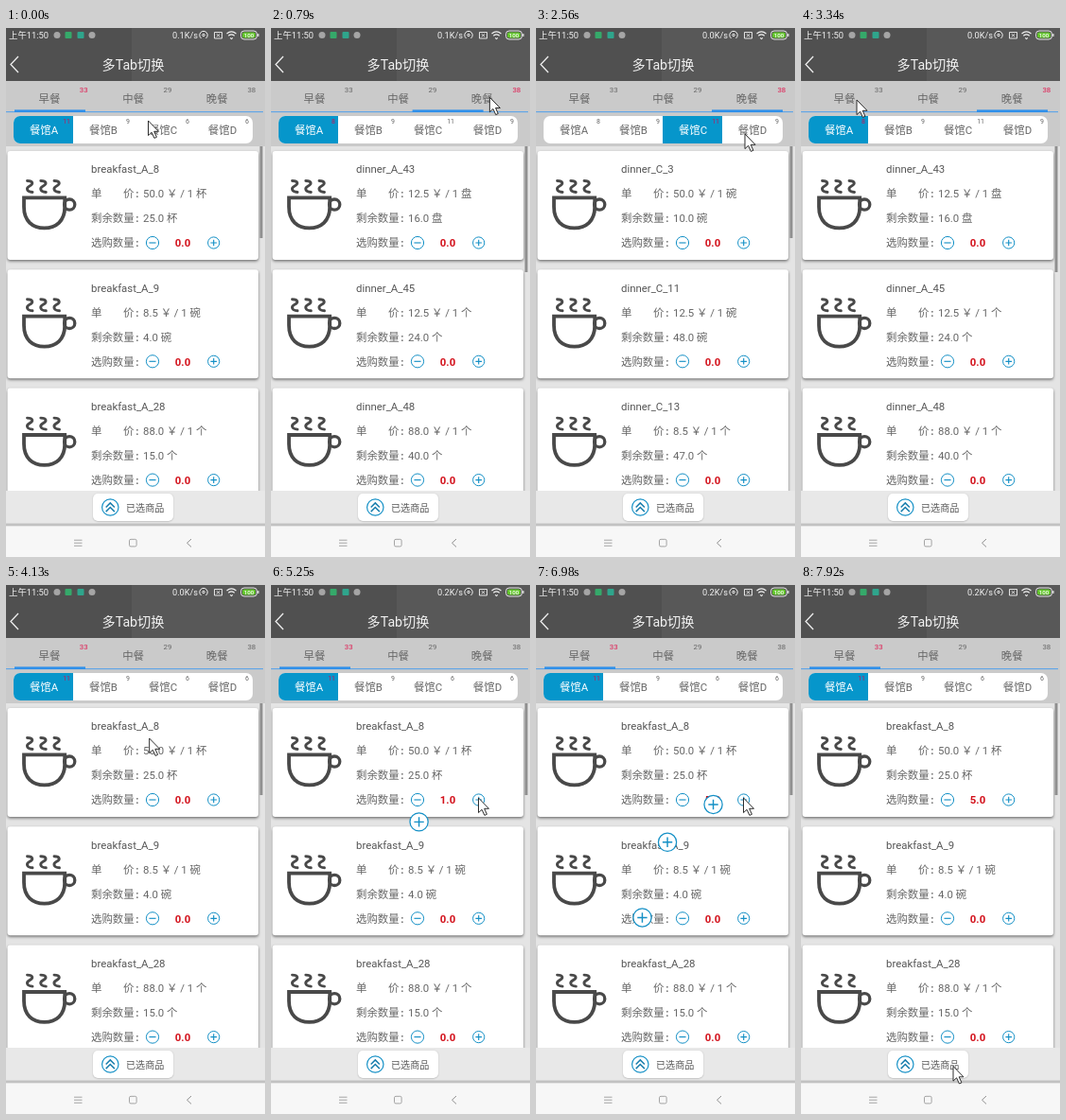
An HTML page with a canvas that plays this animation: 274x559 px, repeating every 8 s.

```html
<!DOCTYPE html>
<html lang="zh">
<head>
<meta charset="utf-8">
<title>多Tab切换</title>
<style>
html, body { margin: 0; width: 100%; height: 100%; overflow: hidden; background: #f7f7f7; }
canvas { display: block; width: 274px; height: 559px; }
</style>
</head>
<body>
<canvas id="stage"></canvas>
<script>
const W = 274, H = 559, LOOP = 8000;
const FONT = 'Roboto, "Noto Sans CJK SC", "Noto Sans CJK", sans-serif';
const BLUE = '#1490c6', GREY = '#666', RED = '#d3121c';
const canvas = document.getElementById('stage');
const ctx = canvas.getContext('2d');
const dpr = window.devicePixelRatio || 1;
canvas.width = W * dpr;
canvas.height = H * dpr;

// Each row: number, price, unit, stock
const MENUS = {
  breakfast_A: [[8, '50.0', '杯', '25.0'], [9, '8.5', '碗', '4.0'], [28, '88.0', '个', '15.0']],
  dinner_A: [[43, '12.5', '盘', '16.0'], [45, '12.5', '个', '24.0'], [48, '88.0', '个', '40.0']],
  dinner_B: [[2, '8.5', '个', '32.0'], [6, '50.0', '碗', '18.0'], [17, '12.5', '盘', '27.0']],
  dinner_C: [[3, '50.0', '碗', '10.0'], [11, '12.5', '碗', '48.0'], [13, '8.5', '个', '47.0']],
  dinner_D: [[1, '12.5', '碗', '21.0'], [5, '88.0', '盘', '36.0'], [14, '8.5', '个', '12.0']]
};
const COUNTS = { breakfast: [11, 9, 6, 6], dinner: [8, 9, 11, 9] };
const TABS = [['早餐', 33], ['中餐', 29], ['晚餐', 38]];

// Time, meal, shop
const VIEWS = [[0, 'breakfast', 0], [620, 'dinner', 0], [1640, 'dinner', 1], [2170, 'dinner', 2],
  [2650, 'dinner', 3], [3080, 'dinner', 0], [3610, 'breakfast', 0]];
const RATES = [[0, '0.1K/s'], [1000, '0.0K/s'], [4550, '0.2K/s']];
// Time, x, y
const POINTER = [[0, 150.5, 98], [120, 150.5, 98], [540, 230, 73], [760, 232, 73], [1450, 118, 109],
  [1650, 116, 109], [2050, 166, 109], [2200, 168, 109], [2520, 221, 112], [2660, 221, 112],
  [3000, 42, 108], [3100, 42, 108], [3320, 59, 76], [3650, 59, 76], [4520, 219.5, 225],
  [7000, 219.5, 225], [7800, 161, 508.5], [8000, 161, 508.5]];
const ADDS = [4990, 5355, 6380, 6620, 6860];
const FLIGHT = 900, PULSE = 150;

const clamp = v => Math.max(0, Math.min(1, v));
const smooth = v => v * v * (3 - 2 * v);
const latest = (list, t) => list.filter(k => k[0] <= t).pop();

function text(s, x, y, size, color = GREY, align = 'left', weight = 400) {
  ctx.font = `${weight} ${size}px ${FONT}`;
  ctx.fillStyle = color;
  ctx.textAlign = align;
  ctx.fillText(s, x, y + size * 0.37);
}

function rect(x, y, w, h, color) {
  ctx.fillStyle = color;
  ctx.fillRect(x, y, w, h);
}

function round(x, y, w, h, r, color) {
  ctx.beginPath();
  ctx.roundRect(x, y, w, h, r);
  ctx.fillStyle = color;
  ctx.fill();
}

function shadowed(blur, dy, alpha, draw) {
  ctx.save();
  ctx.shadowColor = `rgba(0,0,0,${alpha})`;
  ctx.shadowBlur = blur * dpr;
  ctx.shadowOffsetY = dy * dpr;
  draw();
  ctx.restore();
}

function stroke(d, color, width) {
  ctx.strokeStyle = color;
  ctx.lineWidth = width;
  ctx.stroke(new Path2D(d));
}

function ring(x, y, r, color, width, fill) {
  ctx.beginPath();
  ctx.arc(x, y, r, 0, 7);
  if (fill) {
    ctx.fillStyle = fill;
    ctx.fill();
  }
  ctx.strokeStyle = color;
  ctx.lineWidth = width;
  ctx.stroke();
}

function sign(x, y, r, plus, width = 1, fill) {
  const a = r * 0.54;
  ring(x, y, r, BLUE, width, fill);
  stroke(`M${x - a} ${y}h${2 * a}` + (plus ? `M${x} ${y - a}v${2 * a}` : ''), BLUE, width * 1.15);
}

function statusBar(t) {
  const ink = '#f2f2f2';
  text('上午11:50', 3, 8, 9.4, ink);
  round(50.5, 4, 7, 7, 3.5, '#a5a5a5');
  round(62.5, 4, 7, 7, 1, '#35a96a');
  round(75.5, 4, 7, 7, 1, '#2fa58c');
  round(87.5, 4, 7, 7, 3.5, '#a5a5a5');
  text(latest(RATES, t)[1], 176, 8, 9.2, ink);
  ring(209, 7.5, 1.2, ink, 1);
  stroke('M206.6 11A4.2 4.2 0 1 1 211.4 11', ink, 1);
  stroke('M220.5 4.5h8v6.5h-8zM223 6.2l3 3M226 6.2l-3 3', ink, 0.9);
  stroke('M233.5 6Q238.5 1.8 243.5 6M235.3 8.2Q238.5 5.6 241.7 8.2M237.2 10.4L238.5 11.6L239.8 10.4', ink, 1.1);
  ctx.beginPath();
  ctx.roundRect(248.5, 3, 17, 9, 3.5);
  ctx.strokeStyle = ink;
  ctx.lineWidth = 0.9;
  ctx.stroke();
  round(250, 4.4, 14, 6.2, 2, '#62c52b');
  rect(266.3, 6, 1.2, 3, ink);
  text('100', 257, 7.6, 6.2, '#fff', 'center', 500);
}

function header(t) {
  rect(0, 0, 133, 56, '#505050');
  rect(133, 0, W - 133, 56, '#585858');
  statusBar(t);
  stroke('M13 30L5 38.5L13 47', '#eee', 1.3);
  text('多Tab切换', 134.5, 39, 14.2, '#f0f0f0', 'center');
}

function tabs(t, meal, shop) {
  rect(0, 56, W, 69, '#cacaca');
  const active = meal === 'dinner' ? 2 : 0;
  TABS.forEach(([name, n], i) => {
    text(name, 46 + i * 88.6, 75, 11.4, GREY, 'center');
    text(n, 82.2 + i * 88.8, 65.3, 7.8, i === active ? '#e0184f' : GREY, 'center');
  });
  const go = smooth(clamp((t - 620) / 240)) - smooth(clamp((t - 3610) / 240));
  rect(0, 88, 272, 1.2, '#62a6e6');
  rect(9 + 177 * go, 86.4, 75, 2.6, '#2f90ea');

  round(8, 93, 253, 29, 7, '#fff');
  const x = 8 + shop * 63;
  round(x, 93, 63, 29, shop === 0 ? [7, 0, 0, 7] : shop === 3 ? [0, 7, 7, 0] : 0, '#0696cb');
  COUNTS[meal].forEach((n, i) => {
    const on = i === shop;
    text('餐馆' + 'ABCD'[i], 40 + i * 63, 107.7, 11.4, on ? '#fff' : GREY, 'center');
    text(n, 68 + i * 63, 98.7, 7, on ? '#c4165a' : GREY, 'right');
  });
}

function cup(y) {
  const ink = '#494949';
  ctx.save();
  ctx.translate(0, y);
  ctx.lineCap = 'round';
  for (const x of [25, 39.3, 53.5]) {
    stroke(`M${x - 2.5} 31.5C${x + 4} 31.5 ${x + 4} 35 ${x} 37C${x - 4} 39 ${x - 3.5} 43 ${x + 3} 43.5`, ink, 2.9);
  }
  ctx.lineCap = 'butt';
  stroke('M19 49.4H62.2V59C62.2 74 53 81.3 40.6 81.3C28 81.3 19 74 19 59Z', ink, 3.8);
  ring(67.2, 56.6, 5.6, ink, 3.3);
  ctx.restore();
}

function card(y, name, [id, price, unit, stock], qty) {
  shadowed(3, 1.5, 0.5, () => round(1.5, y, 265.5, 115, 3, '#fff'));
  cup(y);
  text(`${name}_${id}`, 90, y + 19, 11.4, '#555');
  text('单', 90, y + 45, 11.4);
  text('价', 124, y + 45, 11.4);
  text('剩余数量', 90, y + 71, 11.4);
  text('选购数量', 90, y + 97, 11.4);
  for (const dy of [45, 71, 97]) text(':', 137.3, y + dy, 11.4, GREY, 'left', 700);
  text(`${price} ￥ / 1 ${unit}`, 145, y + 45, 11.4);
  text(`${stock} ${unit}`, 145, y + 71, 11.4);
  sign(155, y + 97, 6.6, false);
  text(qty.toFixed(1), 187, y + 97, 11.4, RED, 'center', 700);
  sign(219.7, y + 97, 6.1, true);
}

function list(t, meal, shop) {
  const name = meal + '_' + 'ABCD'[shop];
  ctx.save();
  ctx.beginPath();
  ctx.rect(0, 125, W, 364);
  ctx.clip();
  rect(0, 125, W, 364, '#e4e4e4');
  MENUS[name].forEach((row, i) => {
    const qty = i === 0 && meal === 'breakfast' ? ADDS.filter(a => a <= t).length : 0;
    card(130 + i * 125.3, name, row, qty);
  });
  rect(268.5, 125, 3, COUNTS[meal][shop] === 11 ? 97 : 133, '#8f8f8f');
  ctx.restore();
}

function footer(t) {
  rect(0, 489, W, 35, '#e8e8e8');
  rect(0, 523.5, W, 3, '#c2c2c2');
  rect(0, 526.5, W, 33, '#f7f7f7');
  shadowed(1.5, 0.4, 0.25, () => round(92, 492, 85, 29, 5, '#fff'));

  let scale = 1;
  for (const a of ADDS) {
    const p = clamp((t - a - FLIGHT) / PULSE);
    scale -= 0.42 * Math.sin(p * Math.PI);
  }
  ctx.save();
  ctx.translate(110.3, 506.5);
  ctx.scale(scale, scale);
  ring(0, 0, 8.7, BLUE, 1.2);
  stroke('M-4.6 0L0 -4.6L4.6 0M-4.6 4.6L0 0L4.6 4.6', '#1b7fae', 1.5);
  ctx.restore();
  text('已选商品', 127, 506.8, 10.1, '#555');

  stroke('M72 541.2h8.5M72 544.2h8.5M72 547.2h8.5', '#9a9a9a', 0.9);
  ctx.beginPath();
  ctx.roundRect(130.5, 540.3, 7.6, 7.6, 1.5);
  ctx.stroke();
  stroke('M196 540L191.5 544.2L196 548.4', '#909090', 1);
}

function flights(t) {
  for (const a of ADDS) {
    const p = (t - a) / FLIGHT;
    if (p < 0 || p >= 1) continue;
    const q = 1 - p;
    const x = q * q * 220 + 2 * p * q * 88 + p * p * 110;
    const y = 227 + 280 * p * p;
    sign(x, y, 6.2 + 3.4 * clamp(p * 8), true, 1.25, '#fff');
  }
}

function pointer(t) {
  const i = Math.max(1, POINTER.findIndex(k => k[0] > t));
  const [t0, x0, y0] = POINTER[i - 1], [t1, x1, y1] = POINTER[i];
  const p = smooth(clamp((t - t0) / (t1 - t0)));
  ctx.save();
  ctx.translate(x0 + (x1 - x0) * p, y0 + (y1 - y0) * p);
  const arrow = new Path2D('M0 0V15.6L3.6 12.3L6.4 18.4L8.9 17.3L6.2 11.3H11Z');
  ctx.fillStyle = '#fff';
  ctx.fill(arrow);
  ctx.strokeStyle = '#222';
  ctx.lineWidth = 0.95;
  ctx.stroke(arrow);
  ctx.restore();
}

function draw(now) {
  const t = now % LOOP;
  const [, meal, shop] = latest(VIEWS, t);
  ctx.setTransform(dpr, 0, 0, dpr, 0, 0);
  header(t);
  tabs(t, meal, shop);
  list(t, meal, shop);
  footer(t);
  flights(t);
  pointer(t);
}

let start;
function tick(now) {
  start ??= now;
  draw(Math.max(0, now - start));
  requestAnimationFrame(tick);
}
draw(0);
requestAnimationFrame(tick);
</script>
</body>
</html>
```
